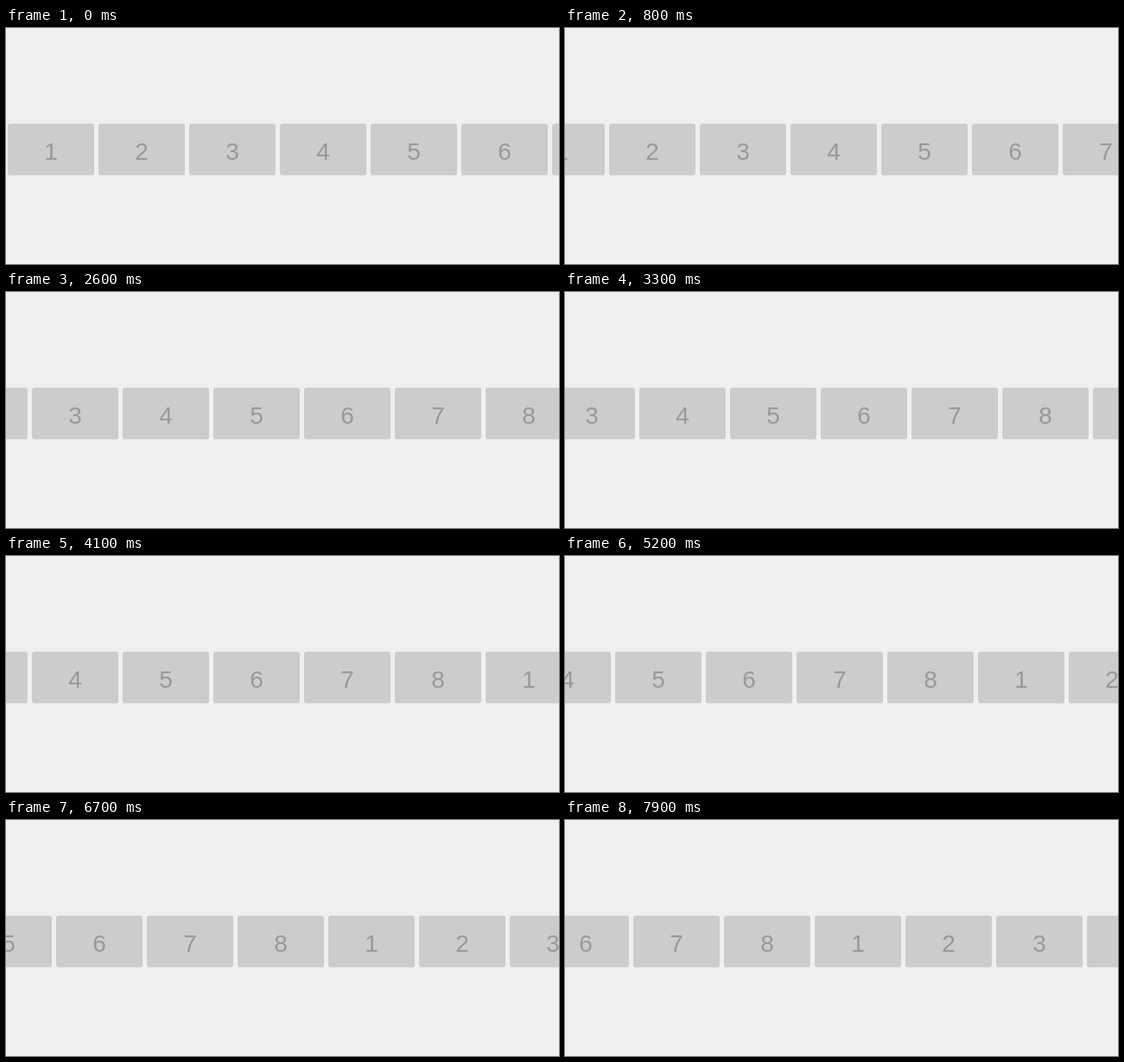
Write an HTML page with a canvas that moves like this. It is 640 by 274 pixels and loops after 8000 ms.

```html
<!DOCTYPE html>
<html lang="en">
<head>
<meta charset="utf-8">
<title>Number carousel</title>
<style>
html, body { margin: 0; width: 100%; height: 100%; overflow: hidden; background: #efefef; }
canvas { display: block; width: 640px; height: 274px; }
</style>
</head>
<body>
<canvas id="stage" width="640" height="274"></canvas>
<script>
const ctx = document.getElementById('stage').getContext('2d');
const W = 640, H = 274;
const LOOP = 8000, STEP = 100, SHIFT = 7;
const CARD = { w: 100, h: 60, pitch: 105, left: 2, top: 111, radius: 3 };
const COUNT = 8;

function drawCard(x, label) {
  ctx.fillStyle = '#cccccc';
  ctx.beginPath();
  ctx.roundRect(x, CARD.top, CARD.w, CARD.h, CARD.radius);
  ctx.fill();
  ctx.fillStyle = '#999999';
  ctx.fillText(label, x + CARD.w / 2, 153);
}

function draw(ms) {
  const offset = Math.floor((ms % LOOP) / STEP) * SHIFT;
  ctx.fillStyle = '#efefef';
  ctx.fillRect(0, 0, W, H);
  ctx.font = '28px "Liberation Sans", Arial, sans-serif';
  ctx.textAlign = 'center';
  ctx.textBaseline = 'alphabetic';
  let i = Math.floor(offset / CARD.pitch);
  for (let x; (x = CARD.left + i * CARD.pitch - offset) < W; i++) {
    drawCard(x, i % COUNT + 1);
  }
}

let start;
function tick(now) {
  start ??= now;
  draw(now - start);
  requestAnimationFrame(tick);
}
draw(0);
requestAnimationFrame(tick);
</script>
</body>
</html>
```
